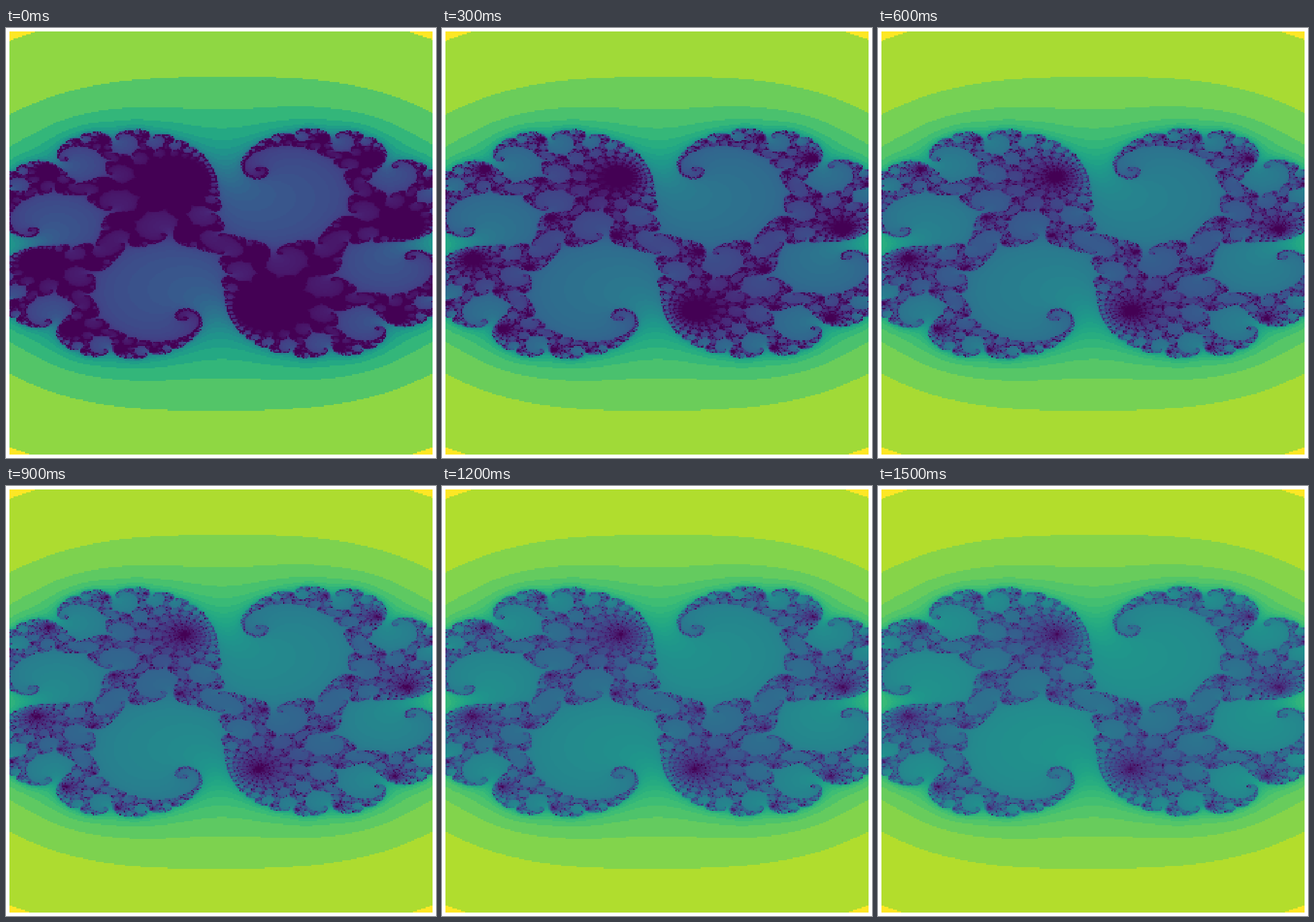
An HTML page with a canvas for the animation above (1800 ms loop, 748 by 748 pixels).

```html
<!DOCTYPE html>
<html lang="en">
<head>
<meta charset="utf-8">
<title>Julia set with a growing iteration limit</title>
<style>
  html, body { margin: 0; width: 100%; height: 100%; overflow: hidden; background: #fff; }
  canvas { display: block; }
</style>
</head>
<body>
<canvas id="stage" width="748" height="748"></canvas>
<script>
const GRID = 300, STEP_MS = 300, STEPS = 6, LIMIT_STEP = 50, MAX_LIMIT = STEPS * LIMIT_STEP;
const C_RE = 0.28, C_IM = 0.008, RADIUS_SQ = 100;
const MARGIN = 6, SIDE = 736, LOG_SHIFT = 0.15;

// Viridis, dark to bright, evenly spaced
const RAMP = ('440154 481568 482677 453781 3f4788 39558c 32648e 2d718e 287d8e 238a8d ' +
  '1f968b 20a386 29af7f 3cbc75 56c667 74d055 94d840 b8de29 dce318 fde725')
  .split(' ').map(h => [0, 2, 4].map(i => parseInt(h.slice(i, i + 2), 16)));

function viridis(v) {
  const p = Math.min(1, Math.max(0, v)) * (RAMP.length - 1);
  const i = Math.min(RAMP.length - 2, Math.floor(p));
  return RAMP[i].map((a, k) => Math.round(a + (RAMP[i + 1][k] - a) * (p - i)));
}

function escapeCount(re, im) {
  let n = 0;
  while (n < MAX_LIMIT && re * re + im * im <= RADIUS_SQ) {
    const next = re * re - im * im + C_RE;
    im = 2 * re * im + C_IM;
    re = next;
    n++;
  }
  return n;
}

// The real axis runs down the picture, the imaginary axis across it
const counts = new Uint16Array(GRID * GRID);
for (let row = 0; row < GRID; row++) {
  for (let col = 0; col < GRID; col++) {
    counts[row * GRID + col] = escapeCount(row / GRID * 3 - 1.5, col / GRID * 2 - 1);
  }
}
const lowest = counts.reduce((a, b) => Math.min(a, b));
const highest = counts.reduce((a, b) => Math.max(a, b));

function render(limit) {
  const depth = n => Math.log((n - lowest + 1 + LOG_SHIFT) / (1 + LOG_SHIFT));
  const deepest = depth(Math.min(limit, highest));
  const colours = Array.from({ length: limit + 1 }, (_, n) =>
    viridis(1 - depth(Math.max(n, lowest)) / deepest));
  const canvas = document.createElement('canvas');
  canvas.width = canvas.height = GRID;
  const ctx = canvas.getContext('2d');
  const image = ctx.createImageData(GRID, GRID);
  counts.forEach((n, i) => {
    image.data.set(colours[Math.min(n, limit)], i * 4);
    image.data[i * 4 + 3] = 255;
  });
  ctx.putImageData(image, 0, 0);
  return canvas;
}

const pictures = Array.from({ length: STEPS }, (_, i) => render((i + 1) * LIMIT_STEP));
const stage = document.getElementById('stage').getContext('2d');
stage.imageSmoothingEnabled = false;

let shown = -1;
function show(index) {
  if (index === shown) return;
  shown = index;
  stage.drawImage(pictures[index], MARGIN, MARGIN, SIDE, SIDE);
}

const start = performance.now();
function tick() {
  show(Math.floor((performance.now() - start) / STEP_MS) % STEPS);
  requestAnimationFrame(tick);
}
tick();
</script>
</body>
</html>
```
